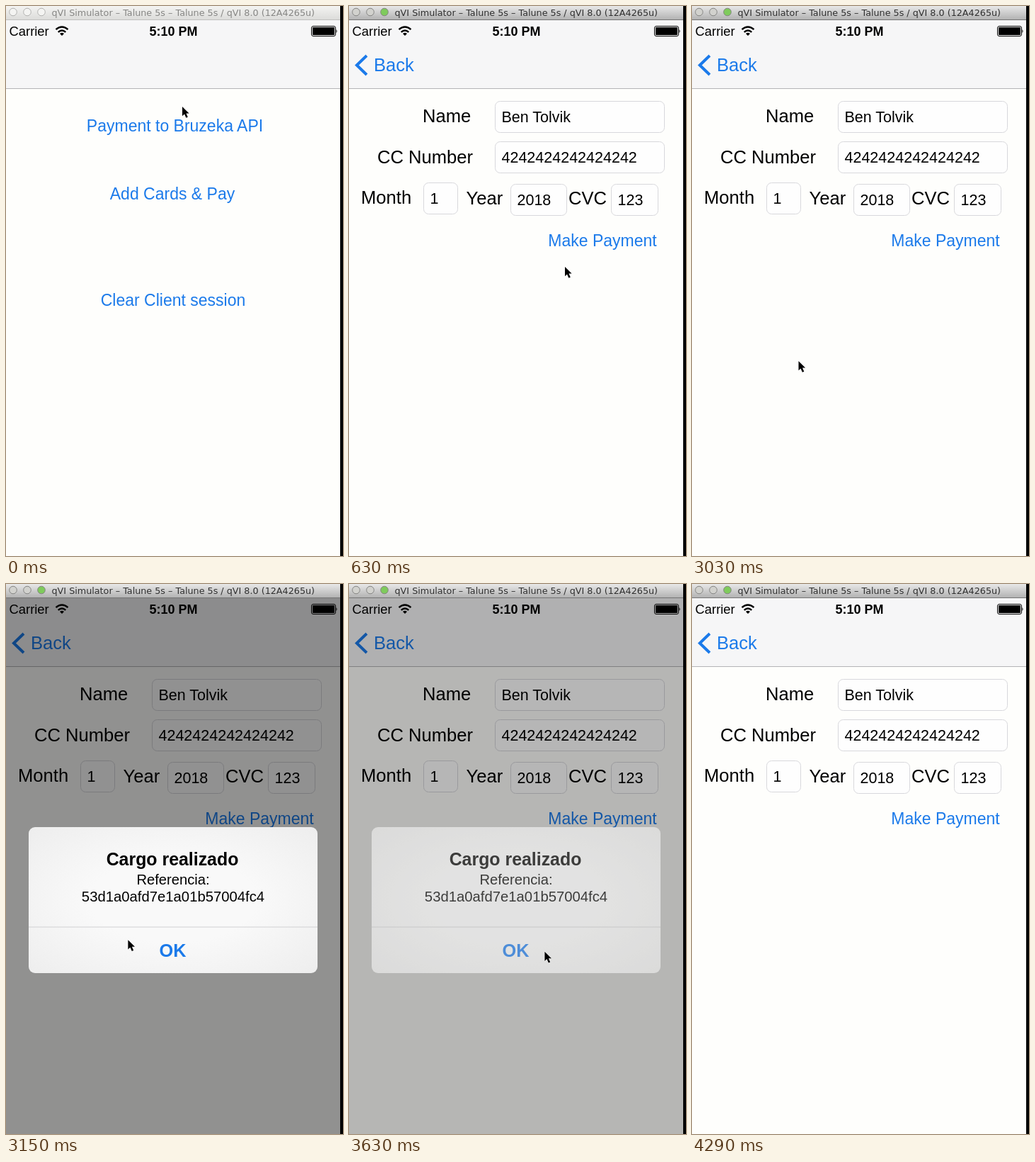
Recreate the animation shown at these times as an HTML page. Size 476 by 776 pixels, loop 4.41 s.

```html
<!DOCTYPE html>
<html lang="en">
<head>
<meta charset="utf-8">
<title>Payment demo</title>
<style>
  html, body { margin: 0; width: 100%; height: 100%; overflow: hidden; background: #000; }
  svg { display: block; width: 476px; height: 776px; font-family: "Liberation Sans", Arial, sans-serif; }
  text { white-space: pre; }
  .blue { fill: #1b7aea; }
  .link { font-size: 23px; }
  .label { font-size: 25.6px; }
  .value { font-size: 21.5px; }
  .mid { text-anchor: middle; }
  .field { fill: #fefefe; stroke: #d8d8dc; }
</style>
</head>
<body>
<svg viewBox="0 0 476 776">
  <defs>
    <linearGradient id="idle" x2="0" y2="1">
      <stop stop-color="#f4f4f2"/><stop offset="1" stop-color="#dcdcda"/>
    </linearGradient>
    <linearGradient id="active" x2="0" y2="1">
      <stop stop-color="#e8e8e8"/><stop offset="1" stop-color="#b3b3b3"/>
    </linearGradient>
    <radialGradient id="glow" r=".72">
      <stop offset=".4" stop-color="#f9f9f9"/><stop offset="1" stop-color="#ededed"/>
    </radialGradient>
    <clipPath id="screen"><rect y="20" width="472" height="756"/></clipPath>
  </defs>

  <rect width="476" height="776"/>
  <g clip-path="url(#screen)">
    <rect y="20" width="472" height="756" fill="#fefefc"/>
    <g id="home" class="mid blue">
      <text id="payLink" class="link" x="238.5" y="177">Payment to Bruzeka API</text>
      <text class="link" x="235" y="273">Add Cards &amp; Pay</text>
      <text class="link" x="236" y="423">Clear Client session</text>
    </g>
    <g id="form">
      <rect y="117" width="472" height="659" fill="#fefefc"/>
      <g id="fields"></g>
      <text id="payButton" class="link blue" x="281.3" y="339">Make Payment</text>
    </g>
    <rect y="20" width="472" height="96" fill="#f6f6f7"/>
    <rect y="116" width="472" height="1" fill="#b4b4b6"/>
    <g id="back" class="blue">
      <path d="M25 70 11 83.5 25 97" fill="none" stroke="#1b7aea" stroke-width="4"/>
      <text class="label" x="35" y="92">Back</text>
    </g>
    <text x="4.5" y="42" font-size="18.4">Carrier</text>
    <text class="mid" x="236.5" y="42" font-size="18" font-weight="bold">5:10 PM</text>
    <path d="M70.5 33.2Q79 25.6 87.5 33.2M73.7 36.8Q79 32 84.3 36.8" fill="none" stroke="#000" stroke-width="2.4"/>
    <path d="M79 42 76 39Q79 36.6 82 39Z"/>
    <rect x="431.5" y="28.5" width="34" height="14" rx="2.5" fill="none" stroke="#000"/>
    <rect x="433" y="30" width="31" height="11" rx="1"/>
    <path d="M466.5 33q2 2.5 0 5z"/>
    <rect id="dim" y="20" width="472" height="756"/>
    <g id="alert" class="mid">
      <rect x="32" y="343" width="408" height="206" rx="9" fill="url(#glow)"/>
      <rect x="32" y="483.5" width="408" height="1" fill="#d2d2d4"/>
      <text x="235" y="397" font-size="24.9" font-weight="bold">Cargo realizado</text>
      <text x="236" y="424" font-size="20.2">Referencia:</text>
      <text x="236" y="448" font-size="20.3">53d1a0afd7e1a01b57004fc4</text>
      <text class="blue" x="235.5" y="526" font-size="25.3" font-weight="bold">OK</text>
    </g>
  </g>

  <rect id="bar" width="472" height="19"/>
  <rect id="barLine" y="19" width="472" height="1"/>
  <g id="lights"></g>
  <text id="title" x="64.5" y="14" font-size="12.75" font-family="DejaVu Sans, sans-serif">qVI Simulator – Talune 5s – Talune 5s / qVI 8.0 (12A4265u)</text>
  <path id="cursor" d="M0 0V13.2L3 10.4 5.4 15.8 7.8 14.7 5.5 9.5H9.6Z" stroke="#fff" stroke-width=".8" paint-order="stroke"/>
</svg>
<script>
const LOOP = 4410, STEP = 30;
const $ = id => document.getElementById(id);
const set = (id, attrs) => {
  for (const [name, value] of Object.entries(attrs)) $(id).setAttribute(name, value);
};
const ramp = (t, from, to) => Math.min(1, Math.max(0, (t - from) / (to - from)));
const smooth = p => p * p * (3 - 2 * p);
const during = (t, from, to) => t >= from && t < to;

const label = (x, y, text) => `<text class="label" x="${x}" y="${y}">${text}</text>`;
const field = (x, y, w, text) =>
  `<rect class="field" x="${x + .5}" y="${y + .5}" width="${w}" height="44" rx="7"/>` +
  `<text class="value" x="${x + 9.5}" y="${y + 30}">${text}</text>`;
$("fields").innerHTML =
  label(104, 164, "Name") + field(206, 134, 239, "Ben Tolvik") +
  label(40, 222, "CC Number") + field(206, 191, 239, "4242424242424242") +
  label(17, 279, "Month") + field(105, 249, 48, "1") +
  label(165.5, 280, "Year") + field(228, 251, 79, "2018") +
  label(310, 280, "CVC") + field(370, 251, 66, "123");
$("lights").innerHTML = [10, 30, 50].map(x => `<circle cx="${x}" cy="8.5" r="5.3"/>`).join("");

// Places where the pointer slows down: the links it clicks and the turns between.
const stops = [
  { at: 0, x: 249, y: 142 },
  { at: 180, x: 232, y: 164 },
  { at: 630, x: 305, y: 368 },
  { at: 1110, x: 372, y: 328 },
  { at: 1290, x: 94, y: 533 },
  { at: 1410, x: 150.5, y: 501 },
  { at: 3030, x: 150.5, y: 501 },
  { at: 3300, x: 203, y: 504 },
  { at: 3600, x: 276, y: 519 },
  { at: 4140, x: 322, y: 486 },
  { at: 4260, x: 62, y: 33 }
];
function pointer(t) {
  const i = stops.findIndex(stop => stop.at > t);
  if (i < 0) return stops[stops.length - 1];
  const a = stops[i - 1], b = stops[i];
  const p = smooth(ramp(t, a.at, b.at));
  return { x: a.x + (b.x - a.x) * p, y: a.y + (b.y - a.y) * p };
}

function drawWindow(active) {
  set("bar", { fill: `url(#${active ? "active" : "idle"})` });
  set("barLine", { fill: active ? "#757575" : "#c0c0be" });
  set("title", { fill: active ? "#303030" : "#868684" });
  set("lights", { fill: active ? "#d2d2ce" : "#f4f4f2", stroke: active ? "#858583" : "#b2b2b0" });
  $("lights").lastChild.setAttribute("fill", active ? "#7fcb5c" : "#f4f4f2");
}

function draw(t) {
  drawWindow(t >= 120);

  const push = 1 - (1 - ramp(t, 180, 330)) ** 3;
  set("home", { transform: `translate(${-142 * push})`, opacity: push < 1 ? 1 : 0 });
  set("form", { transform: `translate(${472 * (1 - push)})` });
  set("back", { transform: `translate(${90 * (1 - push)})`, opacity: push });
  set("payLink", { opacity: during(t, 120, 210) ? .3 : 1 });
  set("payButton", { opacity: during(t, 1110, 1170) ? .3 : 1 });

  const enter = ramp(t, 3030, 3150);
  const shown = enter * (1 - ramp(t, 3600, 3690));
  set("dim", { opacity: .43 * shown });
  set("alert", {
    opacity: shown,
    transform: `translate(236 446) scale(${1 + .2 * (1 - enter) ** 2}) translate(-236 -446)`
  });

  const { x, y } = pointer(t);
  set("cursor", { transform: `translate(${x} ${y})`, visibility: t < 4290 ? "visible" : "hidden" });
}

const start = performance.now();
function tick() {
  const t = (performance.now() - start) % LOOP;
  draw(Math.floor(t / STEP) * STEP);
  requestAnimationFrame(tick);
}
tick();
</script>
</body>
</html>
```
